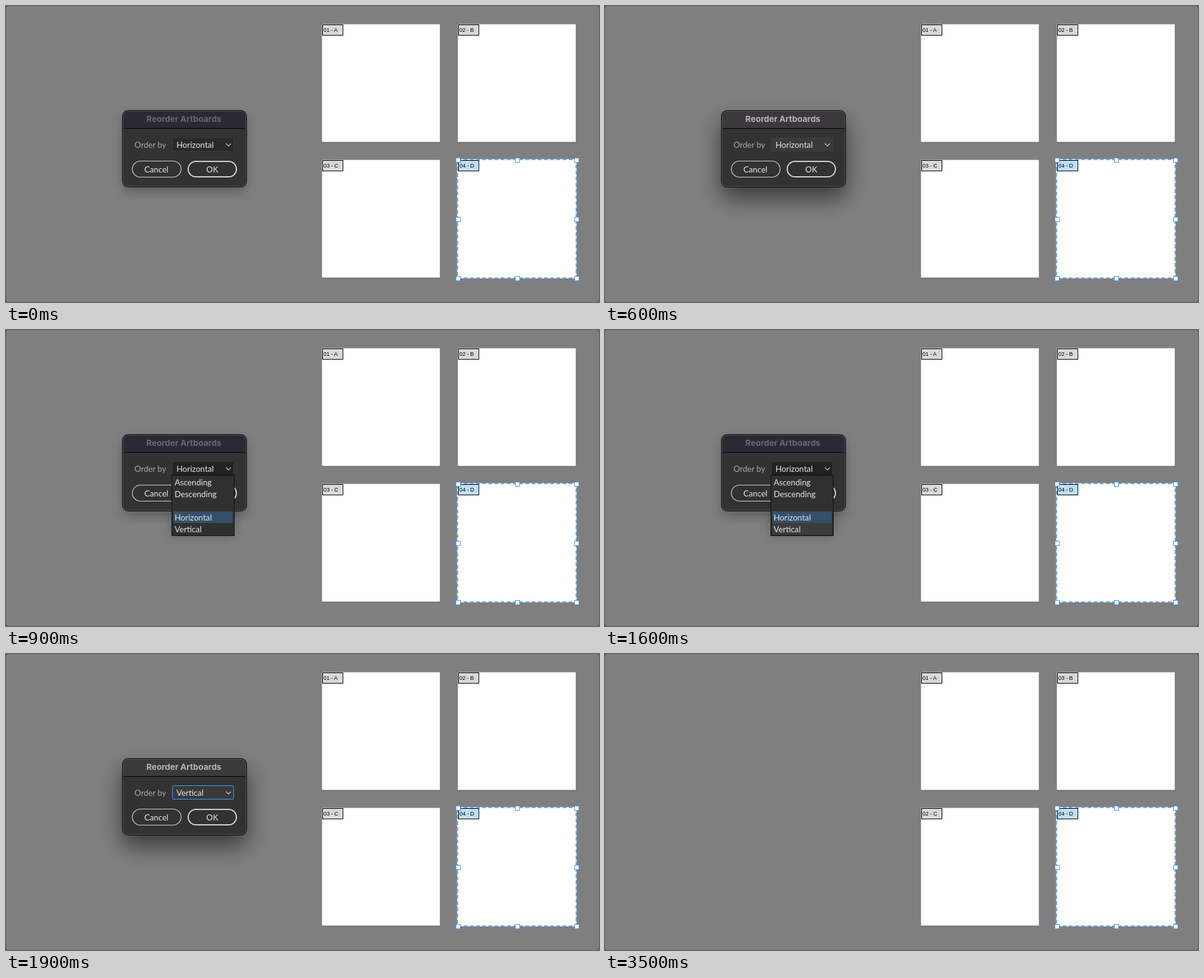
Write an HTML page that moves like this. It is 960x480 px and loops after 5.3 s.

```html
<!DOCTYPE html>
<html lang="en">
<head>
<meta charset="utf-8">
<title>Reorder Artboards</title>
<style>
  html, body { margin: 0; width: 100%; height: 100%; overflow: hidden; background: #404040; }
  svg { display: block; width: 960px; height: 480px; }
  text { font: 13.2px Lato, sans-serif; fill: #e6e6e6; }
  .mid { text-anchor: middle; }
  .title { font: 700 13.4px Inter, sans-serif; text-anchor: middle; }
  .tag { fill: #d9d9d9; stroke: #000; }
  .tag.picked { fill: #bfdfff; }
  .tag text { font: 8.8px "Liberation Sans", Arial, sans-serif; fill: #000; stroke: none; }
  .select { fill: none; stroke: #459af3; stroke-width: 1.5; }
  .handle { fill: #fff; stroke: #459af3; }
  .chevron { fill: none; stroke: #c4c4c4; stroke-width: 1.2; }
  .shadow-on { filter: blur(18px); opacity: .55; }
  .shadow-off { filter: blur(8.5px); opacity: .25; }

  /* Every state switches hard, on one shared clock. */
  .dialog, .active, .inactive, .menu, .hover, .vertical, .horizontal, .pressed, .before, .after {
    animation: 5300ms step-end infinite;
  }
  .dialog, .before { animation-name: until-done; }
  .after { animation-name: after-done; }
  .active { animation-name: active; }
  .inactive { animation-name: inactive; }
  .menu { animation-name: menu; }
  .hover { animation-name: hover; }
  .horizontal { animation-name: horizontal; }
  .vertical { animation-name: vertical; }
  .pressed { animation-name: pressed; }

  @keyframes until-done { 0% { opacity: 1 } 66.038%, 100% { opacity: 0 } }
  @keyframes after-done { 0% { opacity: 0 } 66.038%, 100% { opacity: 1 } }
  @keyframes active {
    0%, 16.981% { opacity: 0 }
    11.321%, 35.849%, 100% { opacity: 1 }
  }
  @keyframes inactive {
    0%, 16.981% { opacity: 1 }
    11.321%, 35.849%, 100% { opacity: 0 }
  }
  @keyframes menu {
    0%, 35.849%, 100% { opacity: 0 }
    16.981% { opacity: 1 }
  }
  @keyframes hover {
    0% { opacity: 0; transform: none }
    22.642% { opacity: 1; transform: none }
    24.528% { opacity: 1; transform: translateY(19px) }
    26.415% { opacity: 0; transform: translateY(38px) }
    28.302% { opacity: 1; transform: translateY(56px) }
    30.189%, 100% { opacity: 1; transform: translateY(75px) }
  }
  @keyframes horizontal { 0% { opacity: 1 } 35.849%, 100% { opacity: 0 } }
  @keyframes vertical { 0% { opacity: 0 } 35.849%, 100% { opacity: 1 } }
  @keyframes pressed { 0% { opacity: 0 } 43.396%, 100% { opacity: 1 } }
</style>
</head>
<body>
<svg viewBox="0 0 960 480">
  <defs>
    <g id="board">
      <rect x="-1" y="-1" width="192.5" height="193" fill="#6c6c6c"/>
      <rect x="-.5" y="-.5" width="191" height="191" fill="#fff"/>
    </g>
    <rect id="tag" x=".5" y=".5" width="33" height="17"/>
    <rect id="handle" x="-3.5" y="-3.5" width="7" height="7"/>
    <rect id="window" x="188.5" y="169.5" width="201" height="124" rx="9"/>
    <path id="titlebar" d="M190 198V179a8 8 0 0 1 8-8H380a8 8 0 0 1 8 8V198Z"/>
  </defs>

  <rect width="960" height="480" rx="4" fill="#7f7f7f"/>

  <use href="#board" x="512" y="30"/>
  <use href="#board" x="732" y="30"/>
  <use href="#board" x="512" y="250"/>
  <use href="#board" x="732" y="250"/>

  <g class="tag" transform="translate(512 30)">
    <use href="#tag"/><text x="2" y="12">01 - A</text>
  </g>
  <g class="tag" transform="translate(732 30)">
    <use href="#tag"/>
    <text class="before" x="2" y="12">02 - B</text>
    <text class="after" x="2" y="12">03 - B</text>
  </g>
  <g class="tag" transform="translate(512 250)">
    <use href="#tag"/>
    <text class="before" x="2" y="12">03 - C</text>
    <text class="after" x="2" y="12">02 - C</text>
  </g>
  <g class="tag picked" transform="translate(732 250)">
    <use href="#tag"/><text x="2" y="12">04 - D</text>
  </g>

  <rect class="select" x="731" y="249" width="192" height="192" style="stroke:#fff"/>
  <rect class="select" x="731" y="249" width="192" height="192" stroke-dasharray="6 4"/>
  <g class="handle">
    <use href="#handle" x="732" y="250"/>
    <use href="#handle" x="828" y="250"/>
    <use href="#handle" x="924" y="250"/>
    <use href="#handle" x="732" y="346"/>
    <use href="#handle" x="924" y="346"/>
    <use href="#handle" x="732" y="442"/>
    <use href="#handle" x="828" y="442"/>
    <use href="#handle" x="924" y="442"/>
  </g>

  <g class="dialog">
    <g class="active"><use class="shadow-on" href="#window" y="18"/></g>
    <g class="inactive"><use class="shadow-off" href="#window" y="8"/></g>
    <g class="menu"><rect class="shadow-off" x="268" y="240" width="102" height="94"/></g>

    <use href="#window" fill="#323232" stroke="#000"/>
    <g class="active">
      <use href="#titlebar" fill="#3b393c"/>
      <text class="title" x="288" y="188" style="fill:#b5b4b6">Reorder Artboards</text>
    </g>
    <g class="inactive">
      <use href="#titlebar" fill="#2b2933"/>
      <text class="title" x="288" y="188" style="fill:#69686f">Reorder Artboards</text>
    </g>
    <path d="M189 198.5H389" stroke="#000"/>
    <rect x="189.5" y="170.5" width="199" height="122" rx="8" fill="none" stroke="#5a5a5a"/>

    <text x="208" y="230" style="fill:#a8a8a8">Order by</text>
    <rect class="active" x="269" y="213" width="100" height="23" rx="2" fill="#3a393b"/>
    <rect class="inactive" x="269.5" y="213.5" width="99" height="22" rx="2" fill="#292929" stroke="#3a3a3a"/>
    <rect class="menu" x="269.5" y="213.5" width="99" height="22" rx="2" fill="#212121" stroke="#3a3a3a"/>
    <rect class="vertical" x="269.5" y="213.5" width="99" height="22" rx="2" fill="#3a393b" stroke="#459af3"/>
    <text class="horizontal" x="276" y="230">Horizontal</text>
    <text class="vertical" x="276" y="230">Vertical</text>
    <path class="chevron" d="M356 223l4 4 4-4"/>

    <rect x="204.5" y="251.5" width="79" height="26" rx="13" fill="none" stroke="#d0d0d0" stroke-width="1.2"/>
    <text class="mid" x="243.5" y="270">Cancel</text>
    <rect x="295" y="252" width="78" height="25" rx="12.5" fill="none" stroke="#d0d0d0" stroke-width="2"/>
    <text class="mid" x="334" y="270">OK</text>
    <g class="pressed">
      <rect x="294" y="251" width="80" height="27" rx="13.5" fill="#cecece"/>
      <text class="mid" x="334" y="270" style="fill:#444">OK</text>
    </g>

    <g class="menu">
      <rect x="268.5" y="235.5" width="101" height="98" fill="#303030" stroke="#0c0c0c"/>
      <rect class="hover" x="271" y="238" width="96" height="19" fill="#3c3c3c"/>
      <rect x="271" y="294" width="96" height="19" fill="#345069"/>
      <text x="273" y="252">Ascending</text>
      <text x="273" y="271">Descending</text>
      <text x="273" y="309">Horizontal</text>
      <text x="273" y="328">Vertical</text>
    </g>
  </g>
</svg>
</body>
</html>
```
